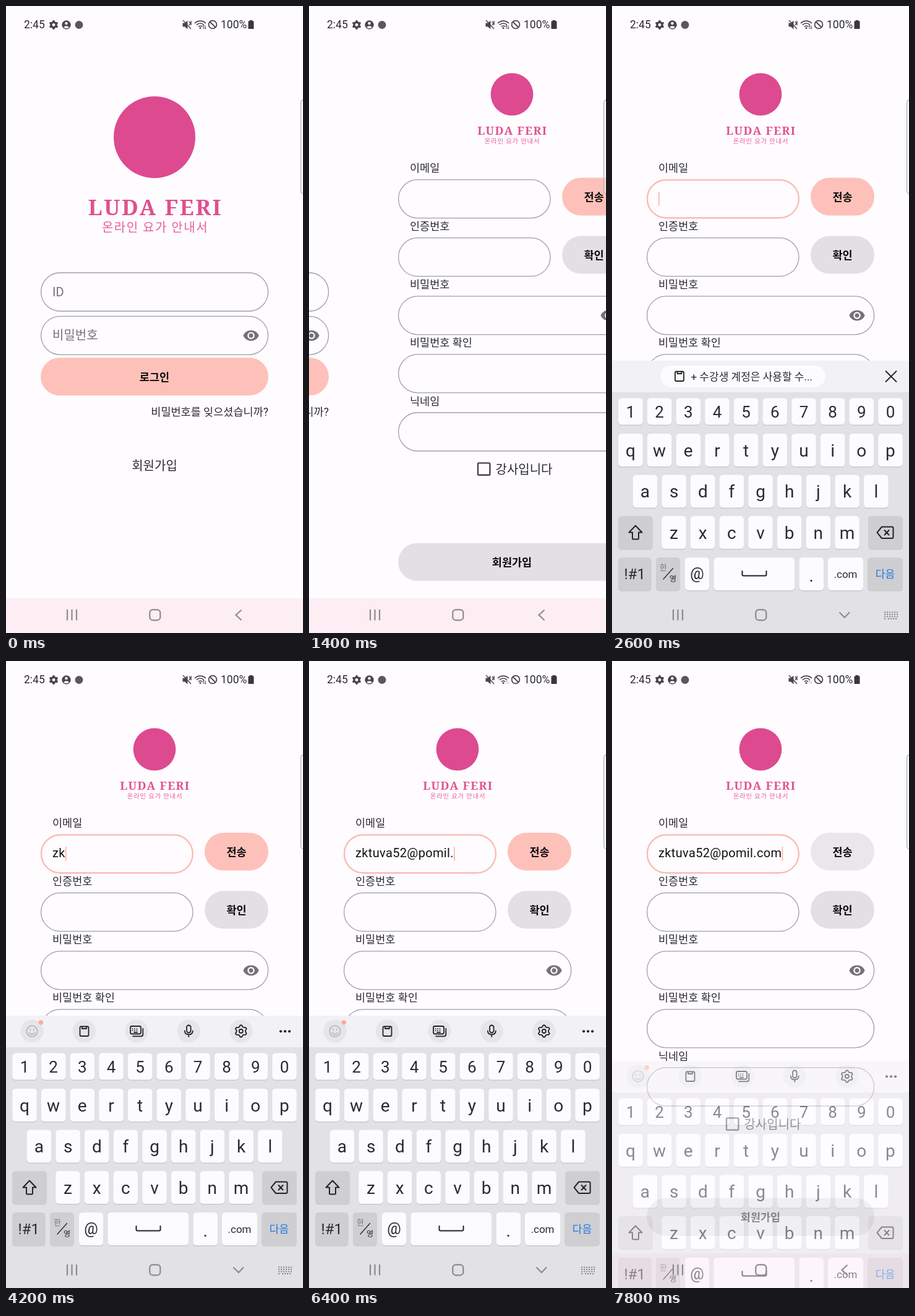
Write an HTML page that moves like this. It is 480 px wide and 1013 px high and loops after 8000 ms.

```html
<!DOCTYPE html>
<html lang="ko">
<head>
<meta charset="utf-8">
<title>회원가입</title>
<style>
html, body { margin: 0; width: 100%; height: 100%; overflow: hidden; background: #fefcff; }
svg { display: block; width: 480px; height: 1013px; }
text { font-family: Roboto, "Noto Sans CJK KR", "Noto Sans CJK JP", sans-serif; fill: #2c2a2e; white-space: pre; }
.mid { text-anchor: middle; }
.end { text-anchor: end; }
.bold { font-weight: 700; fill: #0c0a0c; }
.hint { fill: #747176; }
.name { font: 700 35px "Noto Serif", serif; letter-spacing: 2.6px; fill: #e0508f; }
.tag { letter-spacing: 1.5px; fill: #e85f9a; }
.box { fill: none; stroke: #a19ea2; stroke-width: 1.3; }
.line { fill: none; stroke: #232225; stroke-width: 1.8; stroke-linecap: round; stroke-linejoin: round; }
.bar { fill: none; stroke: #8f898e; stroke-width: 2.2; }
.stat { fill: none; stroke: #49464a; stroke-width: 1.8; }
#email { letter-spacing: .35px; fill: #111; }

#pages, #focus, #keys, #caret, #send, #chip, #tools, .back, .down, #arrows {
  animation: 8s step-end infinite;
}
#pages { animation-name: slide; }
#focus { animation-name: focus; }
#caret { animation-name: blink; }
#send { animation-name: send; }
#keys { animation-name: keys; }
#chip { animation-name: chip; }
#tools { animation-name: tools; }
.back { animation-name: back; }
.down { animation-name: down; }
#arrows { animation-name: arrows; }

@keyframes slide {
  0% { transform: none; }
  15% { transform: translateX(-119px); }
  17.5% { transform: translateX(-392px); }
  20% { transform: translateX(-468px); }
  22.5%, 100% { transform: translateX(-480px); }
}
@keyframes focus { 0% { opacity: 0; } 27.5%, 100% { opacity: 1; } }
@keyframes blink {
  0%, 35%, 47.5%, 90% { opacity: 0; }
  27.5%, 40%, 52.5%, 97.5%, 100% { opacity: 1; }
}
@keyframes send {
  0% { fill: #fec1b9; }
  92.5% { fill: #f6bab2; }
  95%, 100% { fill: #e9e7ea; }
}
@keyframes keys {
  0% { opacity: 0; transform: translateY(73px); }
  30% { opacity: .7; transform: translateY(40px); }
  32.5% { opacity: 1; transform: none; }
  97.5%, 100% { opacity: .55; transform: translateY(73px); }
}
@keyframes chip { 0% { opacity: 1; } 52.5%, 100% { opacity: 0; } }
@keyframes tools { 0% { opacity: 0; } 52.5%, 100% { opacity: 1; } }
@keyframes back { 0%, 97.5%, 100% { opacity: 1; } 32.5% { opacity: 0; } }
@keyframes down { 0%, 97.5%, 100% { opacity: 0; } 32.5% { opacity: 1; } }
@keyframes arrows { 0% { opacity: 1; } 62.5%, 100% { opacity: .3; } }
</style>
</head>
<body>
<svg id="stage" viewBox="0 0 480 1013"></svg>
<script>
const PINK = '#fec1b9', GREY = '#e2e0e3';

// Text is placed by the vertical centre of its letters, on a whole-pixel baseline.
const text = (x, cy, size, str, cls = '') =>
  `<text x="${x}" y="${Math.round(cy + size * .365)}" font-size="${size}" class="${cls}">${str}</text>`;
const rect = (x, y, w, h, r, attrs) =>
  `<rect x="${x}" y="${y}" width="${w}" height="${h}" rx="${r}" ${attrs}/>`;
const circle = (x, y, r, attrs = '') => `<circle cx="${x}" cy="${y}" r="${r}" ${attrs}/>`;
const path = (d, cls, attrs = '') => `<path d="${d}" class="${cls}" ${attrs}/>`;
const group = (attrs, ...parts) => `<g ${attrs}>${parts.join('')}</g>`;

const field = (y, w = 367) => rect(56.6, y, w, 62, 31, 'class="box"');
const button = (x, y, w, label, fill, attrs = '') =>
  rect(x, y, w, 61, 30.5, `fill="${fill}" ${attrs}`) + text(x + w / 2, y + 31, 17.5, label, 'mid bold');
const eye = cy => group(`transform="translate(396 ${cy})"`,
  path('M-12.6 0C-8 -11.3 8 -11.3 12.6 0C8 11.3 -8 11.3 -12.6 0Z', '', 'fill="#757277"'),
  circle(0, 0, 4.6, 'fill="none" stroke="#fefcff" stroke-width="2.3"'));

// Six teeth, one pointing straight up.
function gear(cx, cy, r) {
  const points = Array.from({ length: 24 }, (_, i) => {
    const a = (i - 6.5) * Math.PI / 12, d = i % 4 < 2 ? r : r * .76;
    return `${(cx + d * Math.cos(a)).toFixed(1)} ${(cy + d * Math.sin(a)).toFixed(1)}`;
  });
  return `M${points.join('L')}Z`;
}

const brand = () => [
  circle(240, 212, 66, 'fill="#dd4a90"'),
  '<text x="241.5" y="338" class="name mid">LUDA FERI</text>',
  text(241, 357.5, 20, '온라인 요가 안내서', 'mid tag')
].join('');

const login = () => [
  brand(),
  field(431), text(75, 462, 20, 'ID', 'hint'),
  field(501.3), text(75, 532, 20, '비밀번호', 'hint'), eye(532.5),
  button(56, 568.3, 368, '로그인', PINK),
  text(424, 656, 17.5, '비밀번호를 잊으셨습니까?', 'end'),
  text(240, 743, 20, '회원가입', 'mid')
].join('');

const signup = () => [
  group('transform="translate(240 101) scale(.521) translate(-240 -132)"', brand()),
  ...['이메일', '인증번호', '비밀번호', '비밀번호 확인', '닉네임'].map((label, i) =>
    text(75, 261.5 + i * 94.2, 17.5, label) + field(280.6 + i * 94.1, i < 2 ? 245.4 : 367)),
  rect(57, 281, 244.8, 61.2, 30.6, `id="focus" fill="none" stroke="#fcbfb5" stroke-width="2.4"`),
  '<text id="email" x="75" y="317" font-size="20"></text>',
  rect(75, 300, 2, 23, 0, `id="caret" fill="#fcbfb5"`),
  button(321, 277.5, 103, '전송', PINK, 'id="send"'),
  button(321, 371.6, 103, '확인', GREY),
  eye(500),
  rect(185, 738.4, 19.4, 19.4, 1.5, 'fill="none" stroke="#48454b" stroke-width="2.4"'),
  text(213.5, 748.5, 20, '강사입니다'),
  button(56, 867.7, 368, '회원가입', GREY)
].join('');

const arc = r => `M${314 - r * .74} ${36 - r * .67}A${r} ${r} 0 0 1 ${314 + r * .74} ${36 - r * .67}`;
const status = () => [
  text(29, 30, 17.5, '2:45'),
  path(gear(77, 30.5, 7.6), '', 'fill="#49464a"'), circle(77, 30.5, 2.4, 'fill="#fefcff"'),
  circle(97.5, 30.5, 7.2, 'fill="#49464a"'), circle(97.5, 28, 2.3, 'fill="#fefcff"'),
  path('M93 34.3Q97.5 30 102 34.3Q97.5 38 93 34.3Z', '', 'fill="#fefcff"'),
  circle(118, 30.5, 6.5, 'fill="#5b585c"'),
  path('M285.5 27.5H289L293.5 23.5V37.5L289 33.5H285.5Z', '', 'fill="#49464a"'),
  path('M286 23L299 37M296 25L298 28L296 31M299 24V31', 'stat', 'style="stroke-width:1.4"'),
  path(arc(4) + arc(8) + arc(12), 'stat', 'style="stroke-width:1.7"'),
  circle(314, 35.5, 1.5, 'fill="#49464a"'),
  path('M319 37V31.5M317.8 33L319 31.5L320.2 33M322 31.5V37M320.8 35.5L322 37L323.2 35.5', 'stat', 'id="arrows" style="stroke-width:1"'),
  circle(334, 30, 6.4, 'class="stat"'), path('M329.5 25.5L338.5 34.5', 'stat'),
  text(347, 30, 17.5, '100%'),
  path('M393.5 23H398.5V24.5H400.5V37H391.5V24.5H393.5Z', '', 'fill="#3a373b"')
].join('');

const PITCH = 46.67;
function key(x, y, w, label = '', { h = 53, size = 28, fill = '#fcfbfe', dy = 0 } = {}) {
  return rect(x, y + 1.6, w, h, 5.5, 'fill="#cbc9ce"') + rect(x, y, w, h, 5.5, `fill="${fill}"`) +
    text(x + w / 2, y + h / 2 + dy, size, label, 'mid');
}
const row = (chars, x, y, opts) =>
  [...chars].map((c, i) => key(x + i * PITCH, y, 39.5, c, opts)).join('');

const clipIcon = x => path(
  `M${x - 5} 590.5H${x + 5}Q${x + 7} 590.5 ${x + 7} 592.5V604Q${x + 7} 606 ${x + 5} 606H${x - 5}Q${x - 7} 606 ${x - 7} 604V592.5Q${x - 7} 590.5 ${x - 5} 590.5ZM${x - 3.5} 591V594H${x + 3.5}V591`, 'line');

const chip = () => group('id="chip"',
  rect(78, 581, 267, 35, 17.5, 'fill="#fcfbfe"'), clipIcon(109),
  text(127.5, 599, 17, '+ 수강생 계정은 사용할 수...'),
  path('M442.5 590L459.5 607M459.5 590L442.5 607', 'line'));

const tools = () => group('id="tools"',
  ...[42, 126.5, 211, 295.3, 379.8].map(x => circle(x, 598, 18.6, 'fill="#e6e5e8"')),
  group('style="stroke:#b8b6ba"',
    circle(42, 598, 8.8, 'class="line" style="stroke:inherit"'),
    path('M37.5 600.5Q42 606 46.5 600.5M39 595V596M45 595V596', 'line', 'style="stroke:inherit"')),
  circle(56.3, 584, 3.8, 'fill="#fbad9c"'),
  clipIcon(126.5),
  rect(201, 590, 17, 12.5, 2.5, 'class="line"'),
  path('M205 606.3H218Q221.3 606.3 221.3 603V594', 'line'),
  path('M204.5 594.2H215M204.5 597H215', 'line', 'stroke-dasharray="0 3.5"'),
  path('M207 599.8H212', 'line'),
  rect(292, 588.5, 6.6, 12, 3.3, 'class="line"'),
  path('M288.8 597.5Q289 603.5 295.3 603.5Q301.6 603.5 301.8 597.5M295.3 603.5V607', 'line'),
  path(gear(379.8, 598, 9.6), 'line'), circle(379.8, 598, 3, 'class="line"'),
  ...[444, 451, 458].map(x => circle(x, 598.3, 2.1, 'fill="#232225"')));

const keyboard = () => {
  const dark = { fill: '#cfced1' };
  return group('id="keys"',
    rect(0, 573, 480, 440, 0, 'fill="#e2e1e4"'),
    rect(0, 573, 480, 51, 0, 'fill="#f2f1f4"'),
    chip(), tools(),
    row('1234567890', 10.2, 633.5, { h: 43, size: 26, dy: .5 }),
    row('qwertyuiop', 10.2, 691, { dy: .5 }),
    row('asdfghjkl', 33.7, 757.5),
    key(10, 824, 56, '', dark),
    row('zxcvbnm', 80.2, 824, { dy: .5 }),
    key(414, 824, 56, '', dark),
    path('M38 839.5L48.5 850.5H43V860Q43 861.5 41.5 861.5H34.5Q33 861.5 33 860V850.5H27.5Z', 'line', 'style="stroke-width:2"'),
    path('M436 841.5H452.5Q454.5 841.5 454.5 843.5V858Q454.5 860 452.5 860H436L428.5 850.7ZM440.5 847L447.5 854.5M447.5 847L440.5 854.5', 'line', 'style="stroke-width:2"'),
    key(10, 891, 53.5, '!#1', { ...dark, size: 24 }),
    key(71, 891, 39, '', dark),
    text(83, 907.5, 12.5, '한', 'mid hint'), text(98.5, 925.5, 12.5, '영', 'mid'),
    path('M98.5 908.5L83 926', 'line', 'style="stroke-width:1.2"'),
    key(118, 891, 39, '@', { size: 25, dy: -1 }),
    key(164.5, 891, 130.5),
    path('M210.5 913V918.5Q210.5 920.5 212.5 920.5H247.5Q249.5 920.5 249.5 918.5V913', 'line', 'style="stroke-width:2"'),
    key(302.5, 891, 39.5, '.', { dy: 2 }),
    key(349, 891, 57, '.com', { size: 17 }),
    key(413, 891, 57, '<tspan fill="#1f7ae0">다음</tspan>', { ...dark, size: 17 }));
};

const nav = () => [
  path('M99 975V992.5M106.5 975V992.5M114 975V992.5', 'bar'),
  rect(232.3, 975.3, 17, 17, 5, 'class="bar"'),
  path('M380.5 975.8L371.5 984L380.5 992.2', 'bar back'),
  path('M367.5 979.5L375.8 988L384 979.5', 'bar down'),
  path('M440 979.5H462M440 983H462M440 986.5H462M440 990H444M446 990H456M458 990H462', 'bar down',
    'stroke-dasharray="2.2 1.8" style="stroke-width:1.9"')
].join('');

document.getElementById('stage').innerHTML = [
  rect(0, 0, 480, 1013, 0, 'fill="#fefcff"'),
  group('id="pages"', login(), group('transform="translate(480 0)"', signup())),
  rect(0, 957, 480, 56, 0, 'fill="#fceef3"'),
  status(),
  rect(476.6, 151.8, 20, 151.5, 4, 'fill="#fefcff" fill-opacity=".4" stroke="#aaa8ac" stroke-width="1.2"'),
  keyboard(),
  nav()
].join('');

// Typing: [ms, letters shown]
const ADDRESS = 'zktuva52@pomil.com';
const TYPED = [[4200, 2], [4600, 4], [4800, 5], [5000, 6], [5200, 7], [5400, 8], [5600, 9],
  [5800, 11], [6000, 12], [6200, 14], [6400, 15], [6600, 16], [6800, 18]];
const email = document.getElementById('email');
const caret = document.getElementById('caret');

function tick() {
  const now = performance.now() % 8000;
  const count = TYPED.reduce((n, [at, letters]) => now >= at ? letters : n, 0);
  email.textContent = ADDRESS.slice(0, count);
  caret.setAttribute('x', 75 + (count && email.getComputedTextLength()));
  requestAnimationFrame(tick);
}
tick();
</script>
</body>
</html>
```
